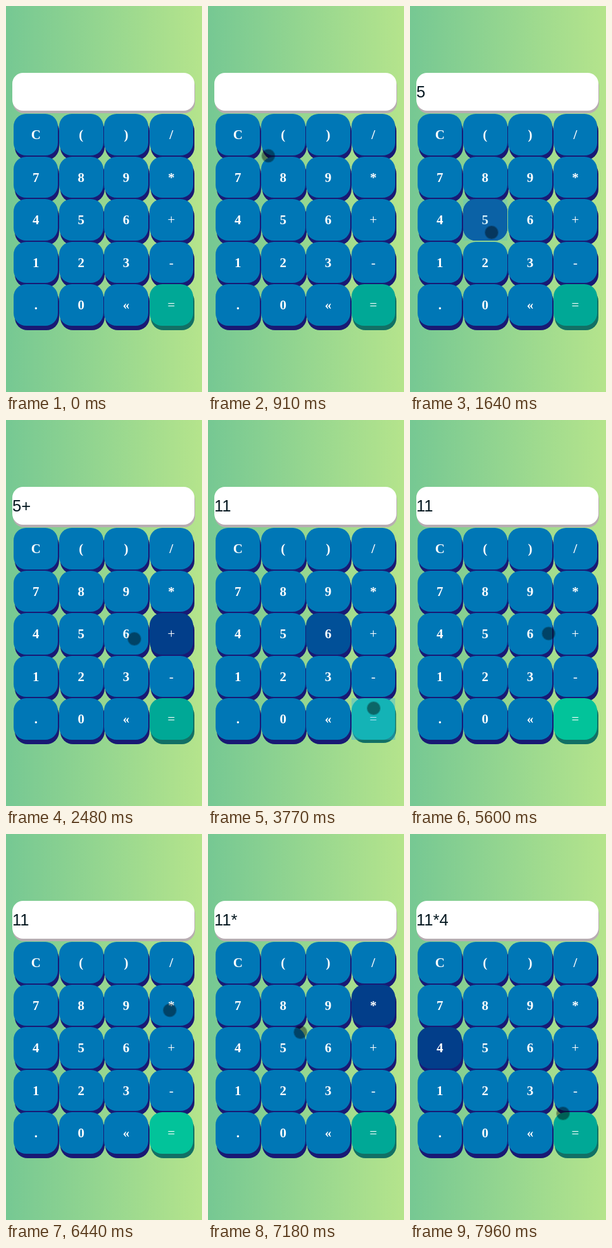
Recreate the animation shown at these times as an HTML page. Size 310 by 612 pixels, loop 8 s.

```html
<!DOCTYPE html>
<html lang="en">
<head>
<meta charset="utf-8">
<title>Calculator</title>
<style>
  html, body { margin: 0; width: 100%; height: 100%; overflow: hidden; }
  #stage {
    position: relative; width: 310px; height: 612px; overflow: hidden;
    background: linear-gradient(to right, #76c893, #b5e48c);
  }
  #stage > div { position: absolute; box-sizing: border-box; }
  #screen {
    left: 10px; top: 106px; width: 288px; height: 60px; border-radius: 17px;
    background: #fff; box-shadow: 1px 4px #b8adb2;
    font: 25.6px/60px "Liberation Sans", Arial, sans-serif; color: #041820;
    white-space: pre;
  }
  .key, #flash { width: 69.8px; height: 65.8px; }
  .key {
    border-radius: 20px; color: #fff; text-align: center;
    font: bold 21px/66px "Liberation Serif", "Times New Roman", serif;
  }
  .key.thin { font-weight: normal; }
  #flash { background: #33b5e5; }
  #dot {
    left: -11px; top: -11px; width: 22px; height: 22px; border-radius: 50%;
    background: rgba(0, 0, 0, .43) padding-box; border: 1px solid rgba(0, 0, 0, .22);
  }
</style>
</head>
<body>
<div id="stage"><div id="screen"></div></div>
<script>
const LOOP = 8000, FADE = 250;
const BLUE = { rest: [0, 119, 182], focus: [2, 62, 138], shade: '#191974' };
const GREEN = { rest: [0, 168, 150], focus: [2, 195, 154], shade: '#127065' };

const CLICKS = [1520, 2080, 2700, 3727, 6690, 7600];

// arrival time, x, y of the pointer
const STOPS = [
  [0, 306, 626], [410, 209, 492], [710, 93, 229], [1110, 129, 359],
  [1840, 247, 350], [2480, 203, 347], [3220, 262, 457], [4250, 111, 357],
  [4990, 179, 335], [5740, 248, 341], [6240, 283, 312], [6440, 259, 279.5],
  [7380, 46, 345], [7960, 242, 443]
];

const stage = document.getElementById('stage');
const screen = document.getElementById('screen');
const clamp = v => Math.max(0, Math.min(1, v));
const mix = (a, b, k) => a + (b - a) * k;
const fade = v => 1 - Math.pow(1 - clamp(v), 2);
const lastBefore = t => CLICKS.filter(c => c <= t).pop() ?? -LOOP;

function add(props) {
  return stage.appendChild(Object.assign(document.createElement('div'), props));
}

function place(el, x, y) {
  el.style.left = x + 'px';
  el.style.top = y + 'px';
}

const keys = [...'C()/789*456+123-.0«='].map((label, i) => {
  const thin = '+-='.includes(label) ? ' thin' : '';
  const el = add({ className: 'key' + thin, textContent: label });
  const x = 12.4 + (i % 4) * 71.4, y = 171.2 + Math.floor(i / 4) * 67.5;
  place(el, x, y);
  return { label, el, x, y, skin: label === '=' ? GREEN : BLUE };
});
const flash = add({ id: 'flash' });
const dot = add({ id: 'dot' });

// The pointer rests first, and always a moment after a click.
function pointerAt(t) {
  const i = STOPS.findIndex(s => s[0] > t);
  if (i < 0) return STOPS[STOPS.length - 1].slice(1);
  const [from, x0, y0] = STOPS[i - 1], [to, x1, y1] = STOPS[i];
  const leave = Math.max(to - .58 * (to - from), lastBefore(to) + 140);
  const k = Math.pow(clamp((t - leave) / (to - leave)), 1.4);
  return [mix(x0, x1, k), mix(y0, y1, k)];
}

// Each click presses the key under the pointer.
let text = '';
const taps = CLICKS.map(click => {
  const [x, y] = pointerAt(click);
  const key = keys.find(k => x >= k.x && x < k.x + 70 && y >= k.y && y < k.y + 66);
  text = key.label === '='
    ? String(text.split('+').reduce((sum, n) => sum + Number(n), 0))
    : text + key.label;
  return { click, key, text };
});

function paintKey(key, t) {
  const { rest, focus, shade } = key.skin;
  const n = taps.findIndex(tap => tap.key === key);
  let lit = 0, lift = 1;
  if (n >= 0) {
    const since = (t - taps[n].click) / FADE;
    const next = taps[n + 1];
    lit = fade(since) - (next ? fade((t - next.click) / FADE) : 0);
    lift = 1 - Math.sin(Math.PI * clamp(since)) ** 2;
  }
  const rgb = rest.map((c, i) => Math.round(mix(c, focus[i], lit)));
  key.el.style.background = `rgb(${rgb})`;
  key.el.style.boxShadow = `${2 * lift}px ${7 * lift}px ${shade}`;
}

function draw(t) {
  keys.forEach(key => paintKey(key, t));

  const done = taps.filter(tap => t >= tap.click).pop();
  screen.textContent = done ? done.text : '';

  const tap = taps.filter(p => t >= p.click - 60).pop();
  flash.style.opacity = tap ? .4 * (1 - clamp((t - tap.click - 40) / 160)) : 0;
  if (tap) place(flash, tap.key.x, tap.key.y);

  const [x, y] = pointerAt(t);
  dot.style.transform = `translate(${x}px, ${y}px)`;
}

const start = performance.now();
function tick() {
  draw((performance.now() - start) % LOOP);
  requestAnimationFrame(tick);
}
tick();
</script>
</body>
</html>
```
